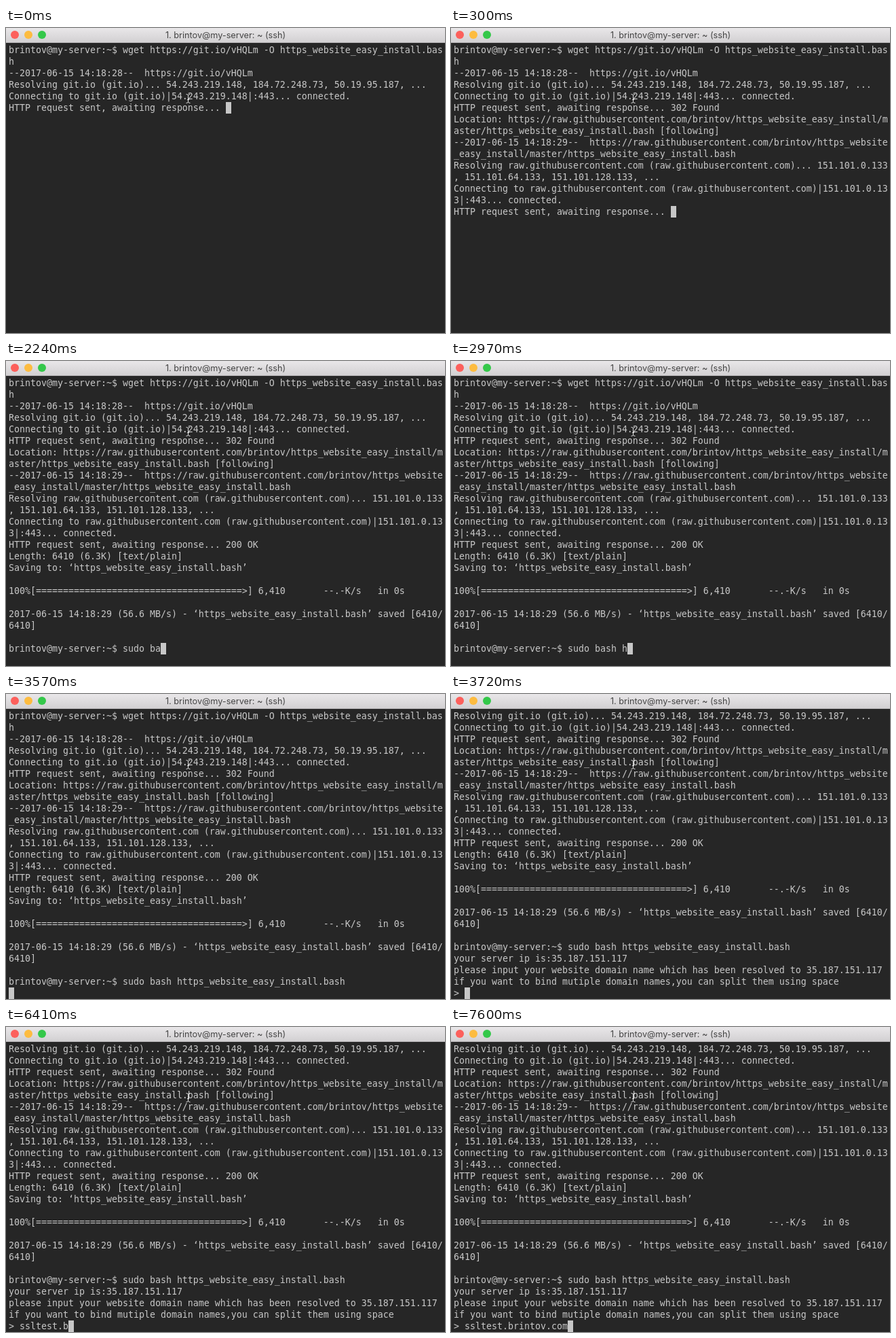
Recreate the animation shown at these times as an HTML page. Size 647x449 px, loop 8 s.

```html
<!DOCTYPE html>
<html lang="en">
<head>
<meta charset="utf-8">
<title>Terminal</title>
<style>
  html, body { margin: 0; width: 100%; height: 100%; overflow: hidden; background: #262626; }
  header {
    position: absolute; inset: 0 0 auto; height: 22px; box-sizing: border-box;
    background: linear-gradient(#e9e7e9, #d2d0d2); border-bottom: 1px solid #b4b2b4;
    font: 12.7px/21px Inter, sans-serif; color: #444; text-align: center;
  }
  header i { position: absolute; top: 4px; width: 12px; height: 12px; border-radius: 50%; }
  pre {
    position: absolute; left: 4px; top: 24px; margin: 0;
    font: 13.29px/17px "DejaVu Sans Mono", monospace; color: #c7c7c7;
    font-variant-ligatures: none;
  }
  #cursor { position: absolute; width: 8px; height: 17px; background: #c7c7c7; }
  svg { position: absolute; left: 264px; top: 96px; }
</style>
</head>
<body>
<header>
  <i style="left:7px;background:#fc605c"></i>
  <i style="left:27px;background:#fdbc40"></i>
  <i style="left:47px;background:#34c84a"></i>
  <span id="title"></span>
</header>
<div id="cursor"></div>
<pre id="screen"></pre>
<svg width="9" height="16" fill="none" stroke="#ddd">
  <path d="M1.5 1.5q3 0 3 2v9q0 2-3 2M7.5 1.5q-3 0-3 2v9q0 2 3 2M3 9.5h3"/>
</svg>
<script>
const LOOP = 8000, COLS = 80, ROWS = 25, CELL_W = 8, CELL_H = 17;
const user = 'brintov', host = `${user}@my-server`, prompt = `${host}:~$ `;
const file = 'https_website_easy_install.bash';
const raw = 'raw.githubusercontent.com', ip = '35.187.151.117';
const url = `https://${raw}/${user}/https_website_easy_install/master/${file}`;
const waiting = 'HTTP request sent, awaiting response... ';

// Splits text into evenly timed chunks, on a 10 ms clock.
function type(start, end, steps, text) {
  const cut = k => Math.round(text.length * k / steps);
  return Array.from({ length: steps }, (_, k) => [
    Math.round((start + (end - start) * k / (steps - 1)) / 10) * 10,
    text.slice(cut(k), cut(k + 1))
  ]);
}

const output = [
  [0, `${prompt}wget https://git.io/vHQLm -O ${file}
--2017-06-15 14:18:28--  https://git.io/vHQLm
Resolving git.io (git.io)... 54.243.219.148, 184.72.248.73, 50.19.95.187, ...
Connecting to git.io (git.io)|54.243.219.148|:443... connected.
${waiting}`],
  [150, `302 Found
Location: ${url} [following]
--2017-06-15 14:18:29--  ${url}
Resolving ${raw} (${raw})... 151.101.0.133, 151.101.64.133, 151.101.128.133, ...
Connecting to ${raw} (${raw})|151.101.0.133|:443... `],
  [300, `connected.\n${waiting}`],
  [600, `200 OK
Length: 6410 (6.3K) [text/plain]
Saving to: ‘${file}’

${(' 0% ['.padEnd(44) + '] 0').padEnd(58) + '--.-K/s'.padEnd(21)}`],
  [750, `\r100%[${'='.repeat(38)}>] 6,410       --.-K/s   in 0s

2017-06-15 14:18:29 (56.6 MB/s) - ‘${file}’ saved [6410/6410]

${prompt}`],
  [900, 's'],
  [1340, 'u'],
  ...type(1940, 2530, 5, 'do bash '),
  [2830, 'h'],
  [2980, 't'],
  [3120, file.slice(2) + ' '],
  [3570, '\n'],
  [3720, `your server ip is:${ip}
please input your website domain name which has been resolved to ${ip}
if you want to bind mutiple domain names,you can split them using space
> `],
  [4470, 's'],
  ...type(5070, 5960, 7, 'sltest.'),
  ...type(6410, 7000, 5, user.slice(0, 6)),
  ...type(7300, 7600, 3, user.slice(6) + '.com')
];

const screen = document.getElementById('screen');
const cursor = document.getElementById('cursor');
document.getElementById('title').textContent = `1. ${host}: ~ (ssh)`;

function draw(now) {
  const time = now % LOOP;
  const text = output.filter(([at]) => at <= time).map(([, chunk]) => chunk).join('');
  const rows = text.replace(/.*\r/g, '').split('\n')
    .flatMap(line => line.match(new RegExp(`.{1,${COLS}}`, 'g')) || [''])
    .slice(-ROWS);
  screen.textContent = rows.join('\n');
  cursor.style.left = 4 + CELL_W * rows.at(-1).length + 'px';
  cursor.style.top = 24 + CELL_H * (rows.length - 1) + 'px';
  requestAnimationFrame(draw);
}
draw(performance.now());
</script>
</body>
</html>
```
